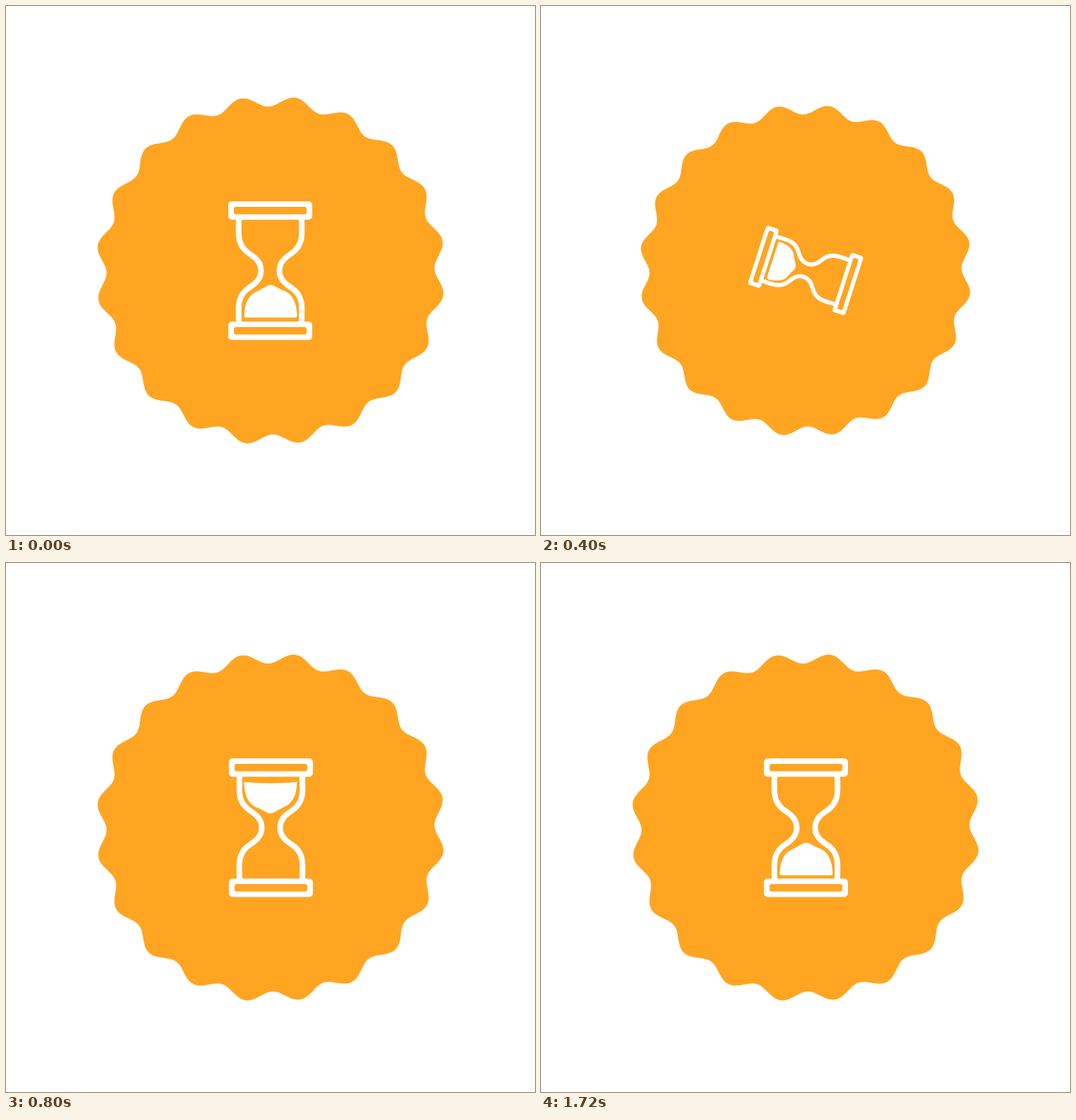
An HTML page for the animation above (2000 ms loop, 748 by 748 pixels).

```html
<!DOCTYPE html>
<html lang="en">
<head>
<meta charset="utf-8">
<title>Hourglass</title>
<style>
  html, body { margin: 0; width: 100%; height: 100%; overflow: hidden; background: #fff; }
  svg { display: block; width: 100vw; height: 100vh; }

  #badge, #icon, #level, #stream, #pile {
    animation: 2s cubic-bezier(.333, 0, .667, 1) infinite;
  }
  #badge { transform-origin: 374px 374px; animation-name: squeeze; }
  #icon {
    transform-origin: 374.1px 374.2px;
    animation-name: shrink, spin;
    animation-timing-function: cubic-bezier(.333, 0, .667, 1), cubic-bezier(.795, 0, .157, 1);
  }
  #level { animation-name: drain; }
  #stream { animation-name: pour; animation-timing-function: linear; }
  #pile { transform-origin: 374.9px 441px; animation-name: grow; }

  .orange { fill: #ffa522; }
  .white { fill: #fff; }
  .wall { fill: none; stroke: #fff; stroke-width: 8; }

  @keyframes squeeze {
    0%, 36%, 100% { scale: 1; }
    12% { scale: .9345; }
  }
  @keyframes shrink {
    0%, 36%, 100% { scale: 1; }
    16% { scale: .707; }
  }
  @keyframes spin {
    0% { rotate: 0deg; }
    40%, 100% { rotate: 180deg; }
  }
  /* The flipped sand sinks towards the neck. */
  @keyframes drain {
    0%, 36% { transform: translateY(8px); }
    40% { transform: translateY(0); }
    56% { transform: translateY(-37.5px); }
    60%, 100% { transform: translateY(-50px); }
  }
  @keyframes pour {
    0%, 40% { y: 349px; height: 0; }
    56% { y: 349px; height: 86px; }
    58% { y: 349px; height: 92px; }
    74%, 100% { y: 441px; height: 0; }
  }
  @keyframes grow {
    0%, 56% { scale: .2 0; }
    86%, 100% { scale: 1 1; }
  }
</style>
</head>
<body>
<svg viewBox="0 0 748 748">
  <defs>
    <path id="mound" d="M339 440.5Q336.5 440.5 336.8 437C337.5 421 342.5 409 354 404C363 400 369 394.5 374.2 394.5C380 394.5 385 400 394 403C406 407.5 411 422 411.7 437Q411.7 440.5 409 440.5Z"/>
    <path id="wall" d="M329.3 299C329 320 325 338 344.5 350.5C352 355.5 360.6 362 360.6 374.2C360.6 386.4 352 392.9 344.5 397.9C325 410.4 329 428.4 329.3 449"/>
    <g id="cap">
      <rect class="white" x="314.2" y="276.2" width="118.8" height="26" rx="5"/>
      <rect class="orange" x="322.2" y="284" width="102.8" height="10.4" rx="3"/>
    </g>
    <clipPath id="surface">
      <path id="level" d="M320 370V441Q374 433 428 441V370Z"/>
    </clipPath>
  </defs>

  <path id="badge" class="orange"/>

  <g id="icon">
    <g class="wall">
      <use href="#wall"/>
      <use href="#wall" transform="translate(747.2 0) scale(-1 1)"/>
    </g>
    <use href="#cap"/>
    <use href="#cap" y="170"/>
    <g clip-path="url(#surface)"><use href="#mound" class="white"/></g>
  </g>

  <rect id="stream" class="white" x="370" width="10"/>
  <g id="pile" class="white"><use href="#mound" x=".8" y="1"/></g>
</svg>
<script>
  // Wavy disc: the radius swings around its mean, once per lobe.
  const center = 374, radius = 239.3, wave = 7.5, lobes = 20, phase = 8.2;
  const points = Array.from({ length: 720 }, (_, i) => {
    const degrees = i / 2;
    const r = radius + wave * Math.cos((degrees - phase) * lobes * Math.PI / 180);
    const angle = degrees * Math.PI / 180;
    return `${(center + r * Math.sin(angle)).toFixed(2)} ${(center - r * Math.cos(angle)).toFixed(2)}`;
  });
  document.getElementById('badge').setAttribute('d', `M${points.join('L')}Z`);
</script>
</body>
</html>
```
